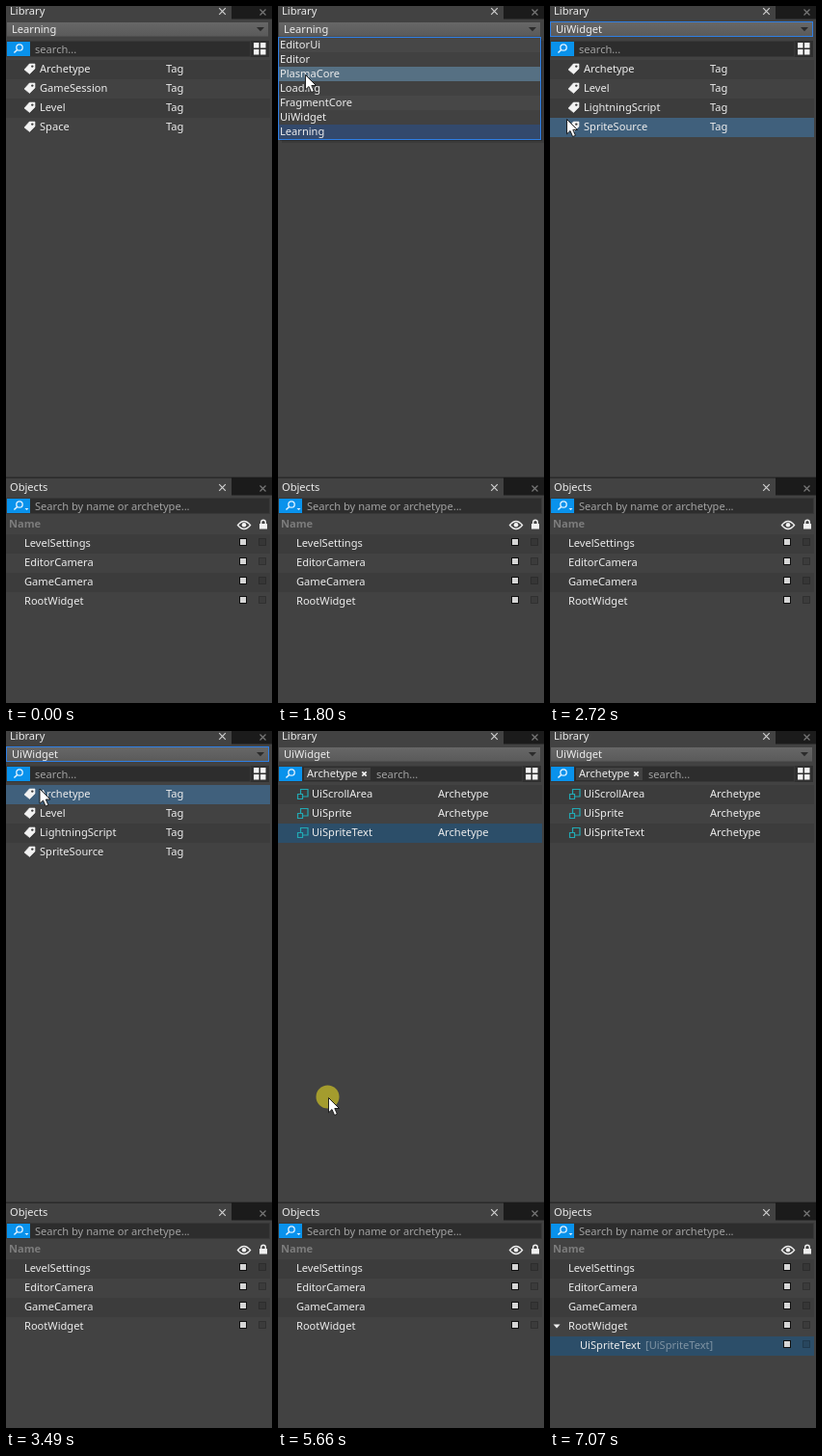
These frames come from a looping animation (276x723 px, 8.23 s). An HTML page:

```html
<!DOCTYPE html>
<html lang="en">
<head>
<meta charset="utf-8">
<title>Library and Objects panels</title>
<style>
  html, body { margin: 0; width: 100%; height: 100%; overflow: hidden; background: #424242; }
  svg { display: block; }
  text { font: 11.1px "Noto Sans", "Open Sans", sans-serif; fill: #ececec; white-space: pre; }
</style>
</head>
<body>
<svg id="stage" width="276" height="723" viewBox="0 0 276 723"></svg>
<script>
const LOOP = 8230, TICK = 77.8, LEAD = 20;
const stage = document.getElementById('stage');

// Moments of the story, in ticks
const ENTER = 5, OPEN = 19, PICK = 29, CLOSE = 31, FIRST_HOVER = 35, CLICK = 48,
      FILTER = 50, GRAB = 68, DROP = 85, ADDED = 86, LEAVE = 91;

// Pointer path: tick, x, y
const path = [
  [5, 100, 586], [14, 57, 10.5], [15, 50, 22], [16, 47, 25], [17, 47, 27], [20, 47, 27],
  [23, 28.5, 71.5], [27, 17, 117], [34, 17, 118], [35, 17.5, 117.5], [36, 20, 122], [40, 35, 67],
  [41, 35, 67], [45, 35, 60], [55, 35, 61], [58, 42.5, 111], [65, 42.5, 111], [66, 43, 110.5],
  [69, 43, 111], [77, 62, 650], [78, 60, 630], [79, 59, 616], [89, 59, 616], [90, 62, 650]
];

const libraries = ['EditorUi', 'Editor', 'PlasmaCore', 'Loading', 'FragmentCore', 'UiWidget', 'Learning'];
const learningTags = ['Archetype', 'GameSession', 'Level', 'Space'];
const widgetTags = ['Archetype', 'Level', 'LightningScript', 'SpriteSource'];
const archetypes = ['UiScrollArea', 'UiSprite', 'UiSpriteText'];
const objects = ['LevelSettings', 'EditorCamera', 'GameCamera', 'RootWidget'];

const HOVER = '#40607c', SELECTED = '#2c4e69', STRIPES = ['#3c3c3c', '#424242'];

const rect = (x, y, w, h, fill, extra = '') =>
  `<rect x="${x}" y="${y}" width="${w}" height="${h}" fill="${fill}" ${extra}/>`;
const shape = (d, fill, extra = '') => `<path d="${d}" fill="${fill}" ${extra}/>`;
const text = (x, y, s, fill = '#ececec', extra = '') =>
  `<text x="${x}" y="${y}" style="fill:${fill};${extra}">${s}</text>`;
const cross = (x, y, r, color, w = 1.2) =>
  shape(`M${x - r} ${y - r}l${2 * r} ${2 * r}m0 ${-2 * r}l${-2 * r} ${2 * r}`, 'none',
    `stroke="${color}" stroke-width="${w}"`);

function pointerAt(n) {
  if (n < ENTER || n >= LEAVE) return null;
  const i = path.findIndex(k => k[0] >= n);
  const b = path[i], a = path[Math.max(0, i - 1)];
  const p = b[0] === a[0] ? 0 : (n - a[0]) / (b[0] - a[0]);
  return { x: a[1] + (b[1] - a[1]) * p, y: a[2] + (b[2] - a[2]) * p };
}

function titleBar(y, label) {
  return rect(234, y - 10, 42, 18.5, '#1b1b1b') + text(4, y + 4, label) +
    cross(224.5, y + .5, 3.3, '#d0d0d0') + cross(266.5, y + 1.5, 3, '#777');
}

function searchBar(y, width, menu) {
  return rect(0, y - 1, width + 1, 17, '#383838') + rect(25, y, width - 25, 15, '#2d2d2d') +
    rect(1, y, 24, 15, '#0992ec') +
    `<circle cx="14" cy="${y + 6}" r="3.2" fill="none" stroke="#e4f3ff" stroke-width="1.3"/>` +
    shape(`M11.6 ${y + 8.5}l-3.2 3`, 'none', 'stroke="#e4f3ff" stroke-width="1.6"') +
    (menu ? shape(`M19.5 ${y + 10}h4l-2 2z`, '#e4f3ff') : '');
}

const tagIcon = y =>
  shape(`M19 ${y + 1}L24.3 ${y - 5}H30V${y}L24.5 ${y + 5.5}Z`, '#f2f2f2', 'stroke="#f2f2f2" stroke-width=".6" stroke-linejoin="round"') +
  `<circle cx="27.3" cy="${y - 2.4}" r="1.2" fill="#3c3c3c"/>`;

const archetypeIcon = y =>
  shape(`M23.5 ${y + .5}v-5h7.5v7.5h-5M20.5 ${y + .5}h5v5h-5z`, 'none', 'stroke="#22a9b4" stroke-width="1.2"');

const rowIndex = (p, top, count) => {
  const i = p ? Math.floor((p.y - top) / 20) : -1;
  return i < count ? i : -1;
};

function library(n, p) {
  const open = n >= OPEN && n < CLOSE, filtered = n >= FILTER;
  const focused = n >= CLOSE && n < CLICK;
  const rows = filtered ? archetypes : n >= CLOSE ? widgetTags : learningTags;
  const waiting = n >= CLOSE && n < FIRST_HOVER;
  const hover = open || waiting ? -1 : rowIndex(p, 56, rows.length);
  const selected = n >= GRAB && n < ADDED ? 2 : -1;

  let s = titleBar(5, 'Library') +
    rect(1, 17, 271, 14.5, 'url(#combo)') +
    (focused ? rect(.5, 16.5, 272, 15, 'none', 'stroke="#2f7fe4"') : '') +
    text(6, 28, n >= CLOSE ? 'UiWidget' : 'Learning') +
    shape('M260 22h8l-4 4.2z', '#2b2b2b') +
    searchBar(37, 253, false) + rect(254, 36, 19, 17, '#303030');
  for (const x of [257, 264]) for (const y of [38, 45]) s += rect(x, y, 5.5, 5.5, '#f4f4f4');

  if (filtered) {
    s += rect(27, 38, 69, 13, '#424242') + text(30, 48, 'Archetype') + cross(89.5, 44.5, 2.2, '#f0f0f0', 1.7);
  }
  s += text(filtered ? 102 : 30, 48.5, 'search...', '#a2a2a2');

  rows.forEach((name, i) => {
    const y = 56 + 20 * i;
    const fill = i === hover ? HOVER : i === selected ? SELECTED : STRIPES[i % 2];
    s += rect(0, y, 274, 20, fill) + (filtered ? archetypeIcon : tagIcon)(y + 9) +
      text(35, y + 13, name) + text(166, y + 13, filtered ? 'Archetype' : 'Tag');
  });
  return s + (open ? dropdown(p) : '');
}

function dropdown(p) {
  let s = rect(4, 36, 272, 106, '#000', 'opacity=".12"') + rect(2, 34, 272, 106, '#000', 'opacity=".25"') +
    rect(0, 32, 273, 107, '#424242');
  const hover = Math.floor((p.y - 33) / 15);
  libraries.forEach((name, i) => {
    const y = 33 + 15 * i;
    const fill = i === hover ? '#567083' : i === 6 ? '#33496c' : i % 2 ? '#414141' : '#474747';
    s += rect(1, y, 271, 15, fill) + text(2, y + 11, name);
  });
  return s + rect(.5, 32.5, 272, 106, 'none', 'stroke="#2f7fe4"');
}

function objectList(n, p) {
  const added = n >= ADDED;
  const rows = added ? [...objects, 'UiSpriteText'] : objects;
  const hover = rowIndex(p, 548, rows.length);
  let s = rect(0, 488.5, 276, 1.5, '#2a2a2a') + titleBar(499, 'Objects') + searchBar(511, 273, true) +
    text(30, 523, 'Search by name or archetype...', '#a2a2a2') +
    text(3, 541, 'Name', '#7c7c7c', 'font-weight:bold') +
    shape('M240.5 538.5q6.5-8 13 0q-6.5 8-13 0z', 'none', 'stroke="#f0f0f0" stroke-width="1.4"') +
    '<circle cx="247" cy="538.3" r="2.3" fill="#f0f0f0"/>' +
    rect(263, 537, 8, 5.5, '#f0f0f0') +
    shape('M264.7 537v-1.5a2.3 2.3 0 0 1 4.6 0v1.5', 'none', 'stroke="#f0f0f0" stroke-width="1.4"');

  rows.forEach((name, i) => {
    const y = 548 + 20 * i, child = i === 4;
    const fill = child ? SELECTED : i === hover ? HOVER : STRIPES[i % 2];
    s += rect(0, y, 274, 20, fill) + text(child ? 31 : 19, y + 13, name) +
      rect(242.5, y + 4.5, 7, 7, '#d6d6d6', 'stroke="#111"') +
      rect(262.5, y + 4.5, 7, 7, '#000', 'fill-opacity=".1" stroke="#000" stroke-opacity=".22"');
    if (child) s += text(99, y + 13, '[UiSpriteText]', '#7f93a3');
  });
  return s + (added ? shape('M3.5 615.5h7l-3.5 4z', '#f0f0f0') : '');
}

function pointer(n, p) {
  if (!p) return '';
  const pressed = [[OPEN, OPEN + 2], [PICK, CLOSE], [CLICK, FILTER], [GRAB, DROP]].some(([a, b]) => n >= a && n < b);
  return (pressed ? `<circle cx="${p.x - 1}" cy="${p.y - 1}" r="12" fill="#b9b02a" opacity=".82"/>` : '') +
    shape('M0 0V15.3L3.5 12L6.1 18L8.9 16.8L6.3 11H11Z', '#fff',
      `stroke="#111" stroke-width=".9" transform="translate(${p.x} ${p.y})"`);
}

const defs = '<defs><linearGradient id="combo" x2="0" y2="1"><stop stop-color="#676767"/><stop offset="1" stop-color="#5a5a5a"/></linearGradient></defs>';

function draw(n) {
  const p = pointerAt(n);
  stage.innerHTML = defs + rect(0, 0, 276, 723, '#424242') + library(n, p) + objectList(n, p) + pointer(n, p);
}

const start = performance.now();
let shown = -1;
function frame() {
  const t = (performance.now() - start) % LOOP;
  const n = Math.floor((t + LEAD) / TICK);
  if (n !== shown) draw(shown = n);
  requestAnimationFrame(frame);
}
frame();
</script>
</body>
</html>
```
